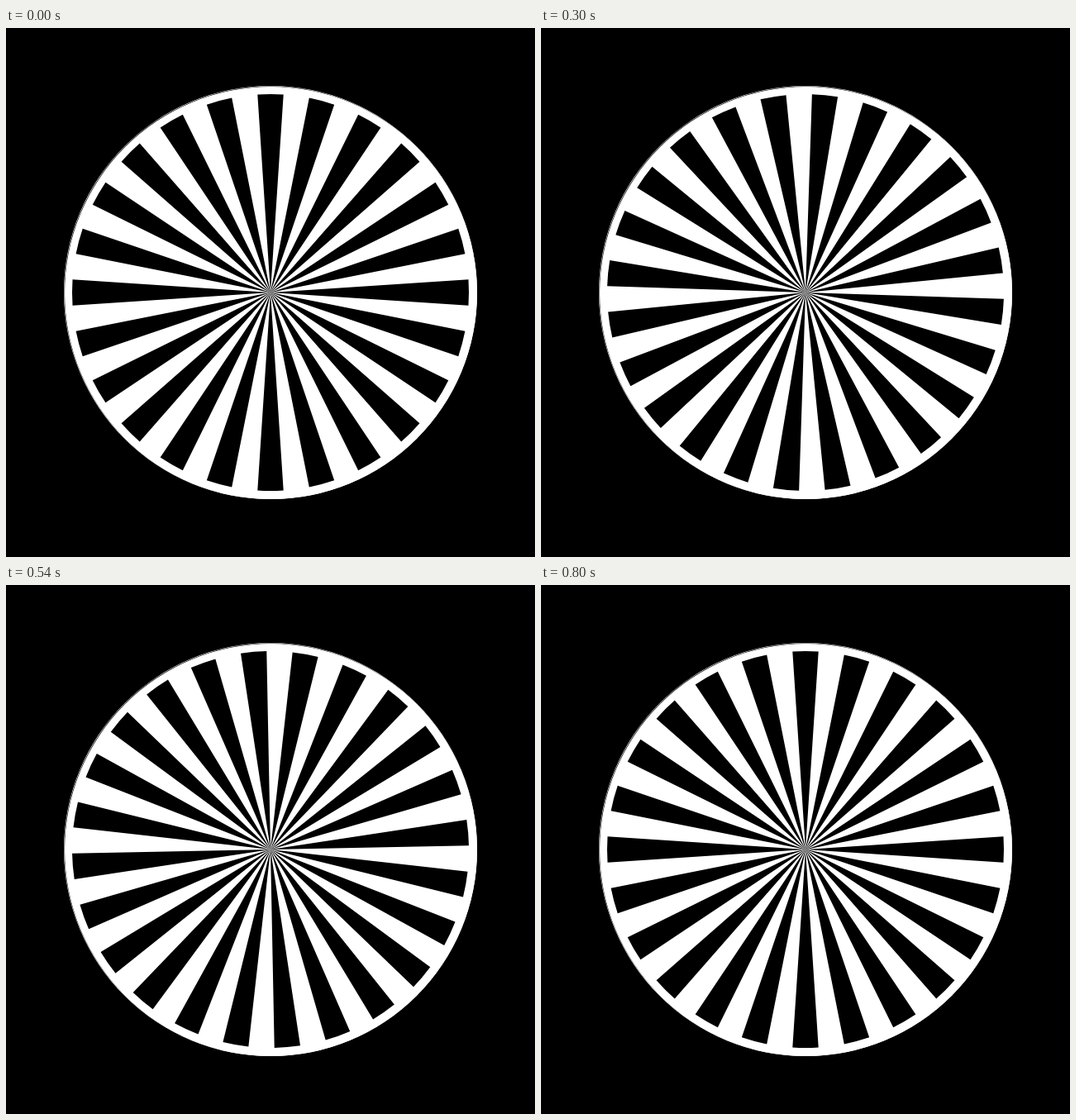
An HTML page with a canvas that plays this animation: 640 by 640 pixels, repeating every 820 ms.

```html
<!DOCTYPE html>
<html lang="en">
<head>
<meta charset="utf-8">
<title>Spinning spokes</title>
<style>
  html, body { margin: 0; height: 100%; background: #000; overflow: hidden; }
  canvas { display: block; }
</style>
</head>
<body>
<canvas width="640" height="640"></canvas>
<script>
const ctx = document.querySelector('canvas').getContext('2d');
const CENTER = 320, SPOKES = 24, RADIUS = 240;
const PITCH = 2 * Math.PI / SPOKES;
const LOOP = 820, TICK = 20, TURN_TIME = 800;

function disc(center, radius, color) {
  ctx.fillStyle = color;
  ctx.beginPath();
  ctx.arc(center, center, radius, 0, 2 * Math.PI);
  ctx.fill();
}

function draw(now) {
  // The wheel steps every 20 ms and turns by one spoke pitch in 800 ms.
  const time = Math.floor(now % LOOP / TICK) * TICK;
  const turn = PITCH * time / TURN_TIME;

  ctx.fillStyle = '#000';
  ctx.fillRect(0, 0, 640, 640);

  // A hairline crescent shows along the upper left rim.
  disc(CENTER, 250, '#fff');
  disc(CENTER, 249.5, '#000');
  disc(CENTER + 0.5, 249.5, '#fff');

  ctx.fillStyle = '#000';
  ctx.beginPath();
  for (let i = 0; i < SPOKES; i++) {
    const angle = turn + i * PITCH;
    ctx.moveTo(CENTER, CENTER);
    ctx.arc(CENTER, CENTER, RADIUS, angle - PITCH / 4, angle + PITCH / 4);
    ctx.closePath();
  }
  ctx.fill();
}

const start = performance.now();
function frame() {
  draw(performance.now() - start);
  requestAnimationFrame(frame);
}
frame();
</script>
</body>
</html>
```
